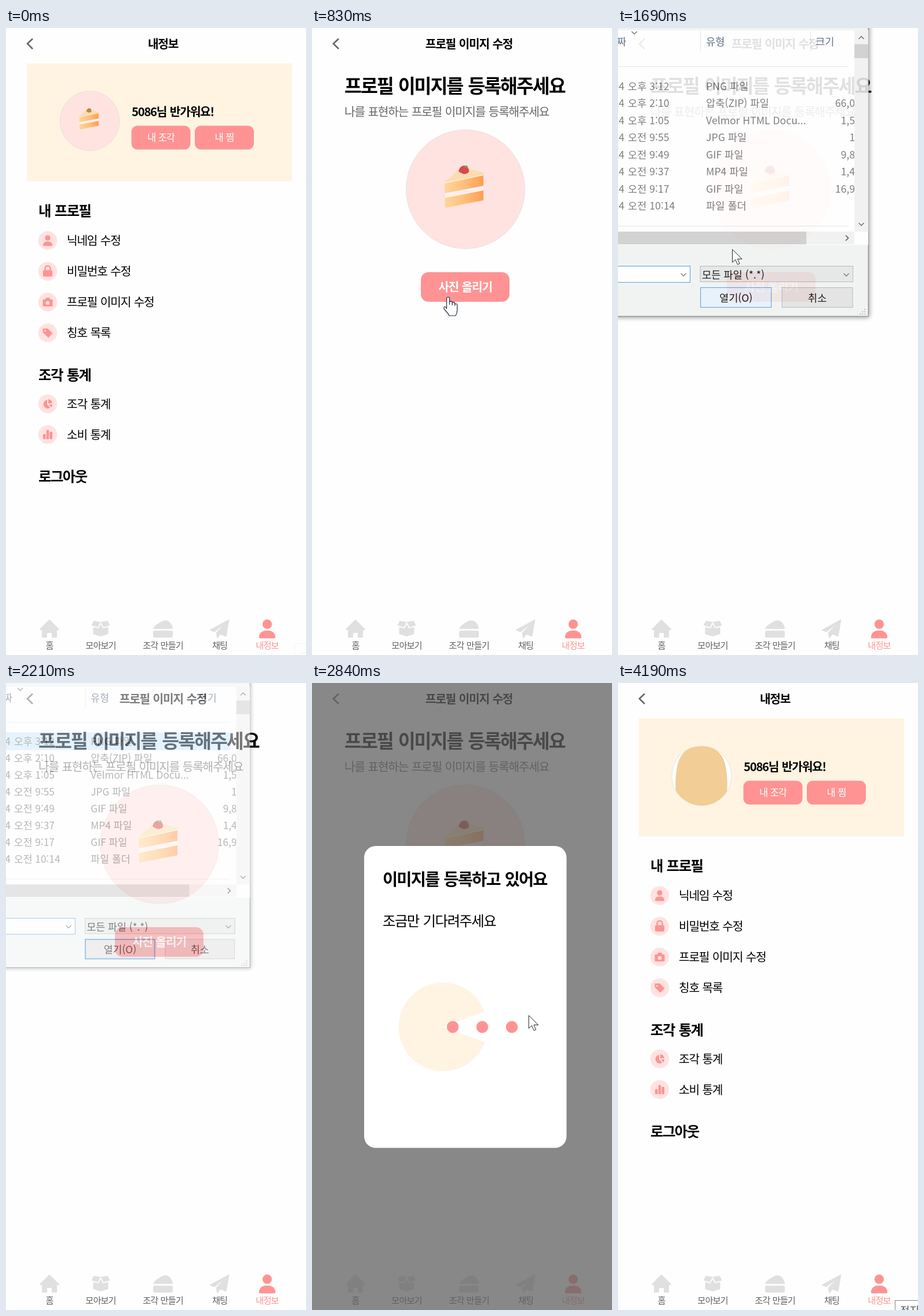
An HTML page that plays this animation: 518 by 1081 pixels, repeating every 4.22 s.

```html
<!DOCTYPE html>
<html lang="ko">
<head>
<meta charset="utf-8">
<style>
html, body { margin: 0; width: 100%; height: 100%; overflow: hidden; background: #fefefe; }
svg { display: block; }
text { font-family: "Noto Sans CJK KR", "Noto Sans CJK", "Noto Sans KR", sans-serif; white-space: pre; }
.app text { letter-spacing: -.062em; word-spacing: .06em; }
</style>
</head>
<body>
<svg id="stage" width="518" height="1081" viewBox="0 0 518 1081"></svg>
<script>
const LOOP = 4220, PINK = '#ff9393', PALE = '#ffe3e1', CREAM = '#fff4e2', GRAY = '#e0e0e0';

// Text is placed by its vertical middle.
const text = (x, y, size, str, fill = '#000', weight = 400, anchor = 'start') =>
  `<text x="${x}" y="${y + size * .38}" font-size="${size}" fill="${fill}" font-weight="${weight}" text-anchor="${anchor}">${str}</text>`;
const rect = (x, y, w, h, fill, r = 0, stroke = 'none') =>
  `<rect x="${x}" y="${y}" width="${w}" height="${h}" rx="${r}" fill="${fill}" stroke="${stroke}"/>`;
const circle = (x, y, r, fill, extra = '') => `<circle cx="${x}" cy="${y}" r="${r}" fill="${fill}" ${extra}/>`;
const path = (d, fill, extra = '') => `<path d="${d}" fill="${fill}" ${extra}/>`;
const line = (d, stroke, width = 1) => path(d, 'none', `stroke="${stroke}" stroke-width="${width}"`);
const group = (content, attrs) => `<g ${attrs}>${content}</g>`;
const at = (x, y, content, scale = 1) => group(content, `transform="translate(${x} ${y}) scale(${scale})"`);

const cake = berry =>
  path('M-36-12L-7-38L30-29L33-25L31-23Z', '#fbdcae') +
  path('M-36-12L31-26V19L-35 32Z', 'url(#sponge)') +
  path('M-36 7L31-6V2L-35 15Z', '#fff0ec') +
  line('M33-26V18', '#fbe5de', 4) +
  line('M-35-11L31-25', '#fdeccd', 2) +
  path('M-12-31Q-10-40-2-41Q7-38 6-30Q-1-22-12-31Z', berry) +
  path('M-5-40L3-41L5-35L0-37Z', '#9b8a4a');
const avatar = (x, y, r) => circle(x, y, r, PALE, 'stroke="#e6dcdb" stroke-width=".8"');

const SOFT = 'stroke="currentColor" stroke-linejoin="round"';
const icons = {
  user: circle(0, -8.1, 8.1, 'currentColor') +
    path('M-14.2 14.4C-14.2 8-9.1 3-2.9 3H2.9C9.1 3 14.2 8 14.2 14.4Q14.2 16.2 12.3 16.2H-12.3Q-14.2 16.2-14.2 14.4Z', 'currentColor'),
  lock: rect(-8, -2, 16, 11, 'currentColor', 2) + line('M-4.5-2V-5a4.5 4.5 0 0 1 9 0V-2', 'currentColor', 2.5),
  camera: path('M-8-4H-4L-3-7H3L4-4H8V7H-8Z', 'currentColor', SOFT) + circle(0, 1.5, 3.3, PALE),
  tag: path('M-8-7H0L8 1L1 8L-8-1Z', 'currentColor', SOFT) + circle(-4.5, -3.5, 1.5, PALE),
  pie: path('M-1-7V1L4.5 6.5A7.5 7.5 0 1 1-1-7Z', 'currentColor') + path('M1-8A8 8 0 0 1 8-1H1Z', 'currentColor') + path('M2 1H8Q8 4 6 6Z', 'currentColor'),
  bars: rect(-8, -1, 4.5, 9, 'currentColor', 1.5) + rect(-2.2, -8, 4.5, 16, 'currentColor', 1.5) + rect(3.5, -5, 4.5, 13, 'currentColor', 1.5),
  home: path('M0-15L16 1H12V14H5V6H-5V14H-12V1H-16Z', 'currentColor', SOFT + ' stroke-width="2"'),
  box: path('M-12-14L0-12L-5-3L-16-6Z', 'currentColor') + path('M12-14L0-12L5-3L16-6Z', 'currentColor') +
    path('M-13-3L-4-1L0-8L4-1L13-3V9L0 13L-13 9Z', 'currentColor'),
  slice: path('M-17 0Q-16-6 0-14Q10-17 15-7Q17-4 17 0Z', 'currentColor') + rect(-17, 3, 34, 12, 'currentColor', 3),
  plane: path('M16-16L11 13L1 9L-4 16L-6 7L9-9L-9 5L-17 2Z', 'currentColor', SOFT),
};
const icon = (name, x, y, color, scale = 1) => group(at(x, y, icons[name], scale), `color="${color}"`);

const header = title => line('M46 18.5L37 27L46 36', '#666', 2.6) + text(271, 27, 20.3, title, '#000', 600, 'middle');
const button = (x, y, w, h, r, size, label, weight) =>
  rect(x, y, w, h, PINK, r) + text(x + w / 2, y + h / 2, size, label, '#fff', weight, 'middle');
const item = (y, name, label) =>
  circle(72, y, 16.3, PALE) + icon(name, 72, y, PINK, name === 'user' ? .57 : 1) + text(105, y, 20.3, label);
const heading = (y, label) => text(56, y, 24.4, label, '#000', 700);

const nav = [['home', 75, '홈'], ['box', 163.5, '모아보기'], ['slice', 271, '조각 만들기'], ['plane', 369, '채팅'], ['user', 451, '내정보']]
  .map(([name, x, label]) => icon(name, x, 1036, name === 'user' ? PINK : GRAY) +
    text(x, 1064, 15.25, label, name === 'user' ? PINK : '#606060', 400, 'middle')).join('');

const profile = header('내정보') + rect(36, 61, 458, 203.5, CREAM) +
  group(avatar(144.5, 160, 51.5) + at(144.5, 159, cake('#bf8b40'), .5), 'id="oldPhoto"') +
  group(circle(144.5, 160, 51.5, '#fff', 'stroke="#e6dcdb" stroke-width=".8"') +
    path('M100 186Q98 172 101 150Q106 109 144 109Q182 109 187 150Q190 172 188 187A51.5 51.5 0 0 1 100 186Z', '#f2cd96', 'id="newPhoto"'), 'id="photo"') +
  text(217, 144, 20.3, '5086님 반가워요!', '#000', 600) +
  button(216.5, 168.5, 102, 41, 10, 16.5, '내 조각') + button(326, 168.5, 102, 41, 10, 16.5, '내 찜') +
  heading(315, '내 프로필') + item(366.5, 'user', '닉네임 수정') + item(419.5, 'lock', '비밀번호 수정') +
  item(472.5, 'camera', '프로필 이미지 수정') + item(525.5, 'tag', '칭호 목록') +
  heading(598, '조각 통계') + item(648, 'pie', '조각 통계') + item(701, 'bars', '소비 통계') + heading(773, '로그아웃');

const upload = header('프로필 이미지 수정') + text(56, 100, 32.5, '프로필 이미지를 등록해주세요', '#000', 700) +
  text(56, 144, 20.3, '나를 표현하는 프로필 이미지를 등록해주세요', '#666') +
  avatar(265, 278, 102.5) + group(at(265, 278, cake('#d9484a')), 'id="bigCake"') +
  button(188, 421, 153, 51, 13, 20.3, '사진 올리기', 600);

const files = [
  ['오후 3:12', 'PNG 파일', ''], ['오후 2:10', '압축(ZIP) 파일', '66,0'], ['오후 1:05', 'Velmor HTML Docu...', '1,5'],
  ['오전 9:55', 'JPG 파일', '1'], ['오전 9:49', 'GIF 파일', '9,8'], ['오전 9:37', 'MP4 파일', '1,4'],
  ['오전 9:17', 'GIF 파일', '16,9'], ['오전 10:14', '파일 폴더', '']];
const fileRow = ([time, type, size], i) => {
  const y = 100 + 29.5 * i, cell = (x, str, anchor) => text(x, y, 17.6, str, '#6d6d6d', 400, anchor);
  return cell(11, '24', 'end') + cell(17, time) + cell(152, type) + cell(409, size, 'end');
};
const chevron = (x, y, dy = 1) => line(`M${x - 4.5} ${y - 2 * dy}L${x} ${y + 2.5 * dy}L${x + 4.5} ${y - 2 * dy}`, '#555', 1.3);
const grip = [[0, 0], [0, 4], [0, 8], [-4, 4], [-4, 8], [-8, 8]].map(([x, y]) => rect(425 + x, 484 + y, 2, 2, '#b8b8b8')).join('');

const dialog = group(rect(-752, -200, 1184, 697, '#f0f2f2', 0, '#666'), 'filter="url(#shadow)"') +
  rect(-752, 4, 1184, 370, '#fff') +
  group(rect(-752, 84, 1150, 31, '#cce8ff'), 'id="selected"') +
  group(files.map(fileRow).join(''), 'clip-path="url(#list)"') +
  text(14, 23, 17.6, '날짜', '#4c607a', 400, 'end') + text(152, 23, 17.6, '유형', '#4c607a') + text(341, 23, 17.6, '크기', '#4c607a') +
  line('M142.5 5V41M332.5 5V41M-9 66.5H397M-9 341.5H397', '#e2e2e2') + chevron(28, 8) +
  rect(408, 4, 24, 347, '#f0f0f0') + rect(408, 28, 24, 24, '#cdcdcd') + chevron(420, 17, -1) + chevron(420, 338) +
  rect(-752, 351, 1160, 22, '#f0f0f0') + rect(-752, 351, 1077, 22, '#cdcdcd') + line('M393 357.5L397.5 362L393 366.5', '#555', 1.8) +
  rect(-400, 410.5, 524.5, 28, '#fff', 0, '#3c94d6') + chevron(113, 425) +
  rect(142, 410.5, 263.5, 27, '#e3e4e4', 0, '#b0b0b0') + text(145, 425, 17.6, '모든 파일 (*.*)') + chevron(394, 425) +
  '<rect id="open" x="142.5" y="447.5" width="122" height="34" stroke="#3c94d6"/>' +
  text(203.5, 465, 17.6, '열기(O)', '#000', 400, 'middle') +
  rect(283, 447.5, 122, 34, '#e1e1e1', 0, '#b0b0b0') + text(344, 465, 17.6, '취소', '#000', 400, 'middle') + grip;

const modal = rect(0, 0, 518, 1081, 'rgba(96,96,96,.75)') + rect(90, 281, 349.5, 520.5, '#fff', 20) +
  text(122, 338, 28.4, '이미지를 등록하고 있어요', '#000', 700) + text(122, 410, 24.4, '조금만 기다려주세요', '#000', 500) +
  `<path id="eater" fill="${CREAM}"/>` + [0, 1, 2].map(i => circle(0, 593, 10.3, PINK, `id="bean${i}"`)).join('');

const cursor = group(path('M.5.5V23L5.5 18L9.5 26.5L13 25L9.3 17H17Z', '#fff', 'id="arrow" stroke="#222"') +
  path('M-2.5 20V2.5a2.5 2.5 0 0 1 5 0V13V9.5a2.3 2.3 0 0 1 4.6 0V14V11a2.3 2.3 0 0 1 4.6 0V15V13.5a2 2 0 0 1 4 0V22Q16 27 13 32H2Q0 28-6.5 21Q-8.5 17-6 16.5Q-4 16.5-2.5 20Z',
    '#fff', 'id="hand" stroke="#222c40" stroke-width="1.2"'), 'id="cursor"');

document.getElementById('stage').innerHTML = `<defs>
  <linearGradient id="sponge"><stop stop-color="#ffd59c"/><stop offset=".55" stop-color="#ffbd78"/><stop offset="1" stop-color="#ff9d55"/></linearGradient>
  <clipPath id="list"><rect x="-752" y="4" width="1160" height="347"/></clipPath>
  <filter id="shadow"><feDropShadow dx="1" dy="1" stdDeviation="4" flood-opacity=".5"/></filter></defs>` +
  group(rect(0, 0, 518, 1081, '#fefefe') + group(profile, 'id="profile"') + group(upload, 'id="upload"') + nav, 'class="app"') +
  group(dialog, 'id="dialog"') + group(modal, 'id="modal" class="app"') + cursor +
  group(rect(498.5, 1061.5, 30, 30, 'none', 0, '#f3f3f3') + line('M508 1077H518', '#efefef'), 'id="trace"') +
  group(rect(478.5, 1064.5, 60, 40, '#fff', 0, '#858585') + text(487, 1082, 18, '정지', '#555'), 'id="tip"');

const $ = id => document.getElementById(id);
const show = (id, on) => $(id).style.display = on ? '' : 'none';
const clamp = v => Math.min(1, Math.max(0, v));

// Pointer stops: time, x, y.
const stops = [[220, 487, 1000], [530, 235, 464], [1050, 235, 464], [1100, 256, 453], [1613, 256, 453], [1880, -30, 105],
  [2270, -30, 105], [2480, 315, 537], [2510, 315, 537], [2960, 386, 580], [3240, 386, 580], [3330, 349, 557], [3540, 497, 740]];
function pointer(t) {
  const i = Math.max(1, stops.findIndex(s => s[0] > t));
  const [t0, x0, y0] = stops[i - 1], [t1, x1, y1] = stops[i];
  const u = clamp((t - t0) / (t1 - t0)), e = u * u * (3 - 2 * u);
  return [x0 + (x1 - x0) * e, y0 + (y1 - y0) * e];
}

function drawLoader(t) {
  const phase = (t - 2230) / 500 % 1;
  const a = Math.max(.01, (1 - Math.abs(2 * phase - 1)) * Math.PI / 4);
  const x = 226 + 76.5 * Math.cos(a), y = 76.5 * Math.sin(a);
  $('eater').setAttribute('d', `M226 593L${x} ${593 - y}A76.5 76.5 0 1 0 ${x} ${593 + y}Z`);
  for (let i = 0; i < 3; i++) {
    const p = (phase + i / 3) % 1;
    $('bean' + i).setAttribute('cx', 379 - 153 * p);
    $('bean' + i).setAttribute('opacity', clamp(p / .2));
  }
}

function draw(t) {
  const uploading = t >= 800 && t < 2950;
  show('upload', uploading);
  show('profile', !uploading);
  show('bigCake', t >= 830);
  show('oldPhoto', t < 800);
  show('photo', t >= 2950);
  show('newPhoto', t >= 2980);

  const alpha = Math.min(clamp((t - 1520) / 195), clamp((2260 - t) / 100));
  show('dialog', alpha > 0);
  $('dialog').setAttribute('opacity', alpha);
  $('dialog').setAttribute('transform', `translate(-160 150) scale(${1 + .048 * (alpha - .87)}) translate(160 -150)`);
  show('selected', t >= 1840);
  $('open').setAttribute('fill', t < 1750 ? '#e5f1fb' : '#e1e1e1');
  $('open').setAttribute('stroke-width', t < 1750 ? 1 : 2);

  const loading = t >= 2240 && t < 2950;
  show('modal', loading);
  if (loading) drawLoader(t);

  const moving = t >= 220 && t < 3540;
  show('cursor', moving);
  if (moving) $('cursor').setAttribute('transform', `translate(${pointer(t)})`);
  const hand = t >= 500 && t < 1560;
  show('hand', hand);
  show('arrow', !hand);
  show('trace', t < 220);
  show('tip', t >= 4190);
}

const start = performance.now();
function tick() {
  draw((performance.now() - start) % LOOP);
  requestAnimationFrame(tick);
}
tick();
</script>
</body>
</html>
```
